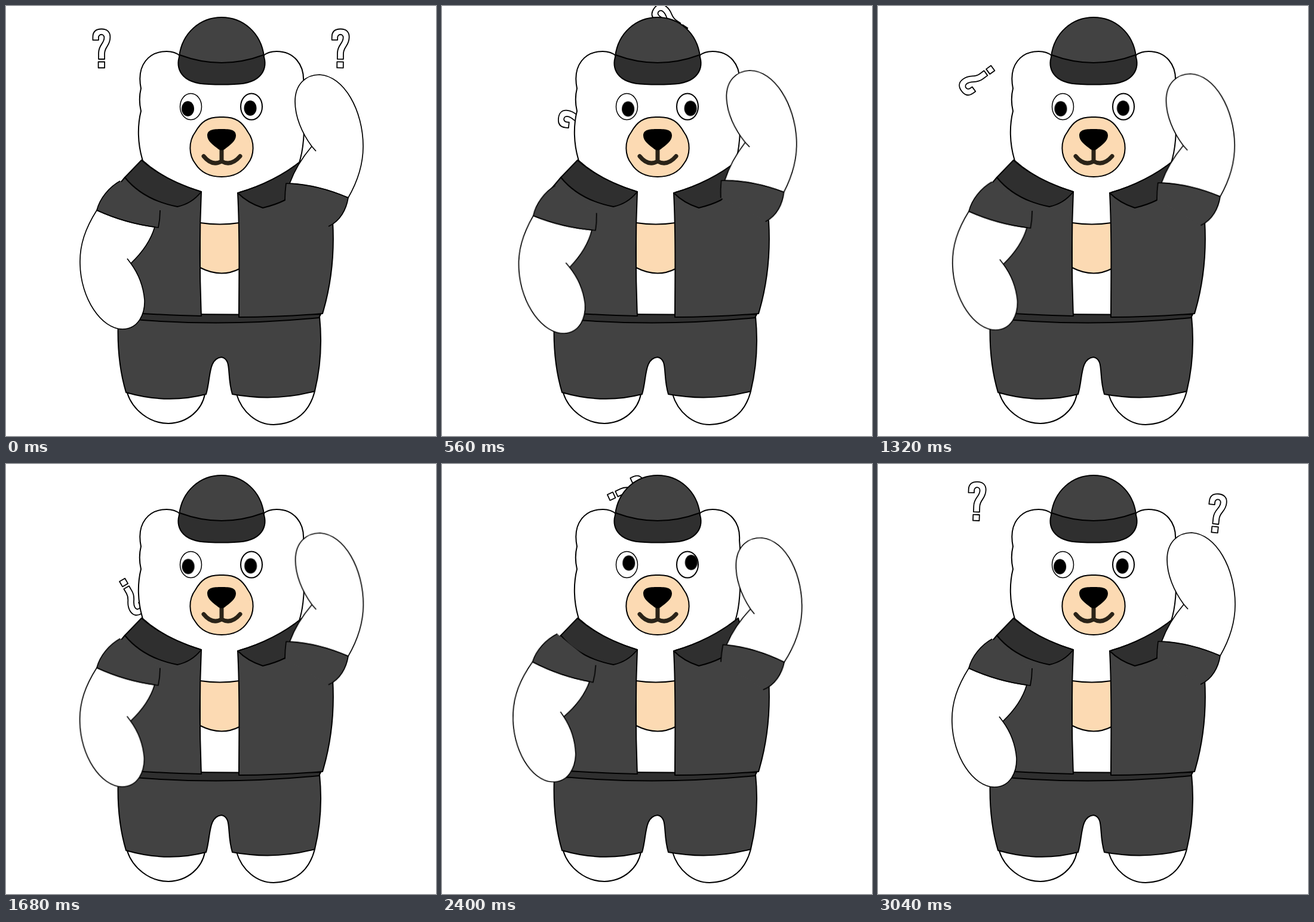
An HTML page that plays this animation: 720x720 px, repeating every 3.08 s.

```html
<!DOCTYPE html>
<html lang="en">
<head>
<meta charset="utf-8">
<title>Puzzled bear</title>
<style>
  :root { --loop: 3080ms; }
  html, body { margin: 0; width: 100%; height: 100%; overflow: hidden; background: #fff; }
  svg { display: block; width: 100vw; height: 100vh; stroke: #000; stroke-width: 2; stroke-linejoin: round; }
  .white { fill: #fff; }
  .cloth { fill: #424242; }
  .trim { fill: #2f2f2f; }
  .tan { fill: #fcdab3; }
  .line { fill: none; }
  .bare { stroke: none; }

  /* Both marks run round closed paths at a steady speed and turn with them */
  .mark {
    transform-origin: 0 0;
    animation: circle var(--loop) steps(77) infinite;
  }
  #markL {
    offset-path: path("M160 71C147 92 175 118 190 146C279 313 573 167 412 66C365 37 292 52 244 25C209 6 181 37 160 71Z");
    offset-rotate: auto -122deg;
  }
  #markR {
    offset-path: path("M560 71C538 39 496 34 457 28C395 18 332 24 269 31C217 36 176 83 163 133C140 215 240 245 340 245C440 245 640 186 560 71Z");
    offset-rotate: auto -235deg;
  }
  @keyframes circle {
    from { offset-distance: 0%; }
    to { offset-distance: 100%; }
  }

  #arms {
    stroke-width: 1.7;
    transform-origin: 361px 328px;
    animation: sway var(--loop) ease-in-out infinite;
  }
  @keyframes sway {
    0%, 50%, 100% { transform: rotate(0deg); }
    25% { transform: rotate(-3deg); }
    75% { transform: rotate(3deg); }
  }

  #pupils { animation: look var(--loop) ease-in-out infinite; }
  @keyframes look {
    0%, 50%, 100% { transform: translate(0, 0); }
    25% { transform: translate(8.4px, 0.5px); }
    75% { transform: translate(9px, -6px); }
    87% { transform: translate(3.5px, -7.5px); }
  }
</style>
</head>
<body>
<svg viewBox="0 0 720 720">
  <defs>
    <g id="shape" class="white" stroke-width="1.8">
      <path d="M-14.5 -14V-19C-14.5 -28 -9 -32.5 0 -32.5C9 -32.5 14.5 -28 14.5 -19C14.5 -4 5 -3 5 9V18H-5V8C-5 -6 4.5 -8 4.5 -18C4.5 -25 -5 -25 -5 -18V-14Z"/>
      <path d="M-5.5 22.5H5V32.5H-5.5Z"/>
    </g>
  </defs>

  <!-- circling marks, behind the bear -->
  <g id="markL" class="mark"><use href="#shape"/></g>
  <g id="markR" class="mark"><use href="#shape"/></g>

  <!-- legs -->
  <path class="white" d="M203 648C212 676 240 699 272 699C305 698 328 676 333 650Z"/>
  <path class="white" d="M386 650C395 680 420 701 448 701C485 700 508 680 517 645Z"/>
  <path class="cloth" d="M188 525C186 570 190 610 201 647Q270 667 335 650C343 625 338 590 361 588C379 592 369 617 379 650Q450 663 517 645C528 600 529 560 525 520Z"/>

  <!-- head and chest -->
  <path class="white bare" d="M325 300H391V517H325Z"/>
  <path class="white" d="M229 259C220 230 220 200 226 176C223 163 223 150 226 138C218 98 240 76 269 76C279 76 286 79 291 83H431C437 78 444 76 453 76C482 76 500 98 498 128C501 160 500 185 499 210C498 235 495 250 491 262Q450 295 388 313L390 330H326L327 311Q265 292 229 259Z"/>
  <path class="white bare" d="M325 305H391V517H325Z"/>
  <path class="tan" d="M325 363Q358 368 391 363V440Q360 456 325 438Z"/>

  <!-- belt and vest -->
  <path class="trim" d="M205 514Q360 518 527 516L524 522Q360 538 205 524Z"/>
  <path class="cloth" d="M199 287L178 312L200 420V513Q270 518 327 519C325 470 323 400 327 311Z"/>
  <path class="cloth" d="M388 313C392 390 390 450 390 521Q460 521 530 515C545 465 550 410 547 360L525 312L490 295L430 335Z"/>
  <path class="trim" d="M227 258Q265 292 327 311Q311 331 287 336Q230 325 199 287Z"/>
  <path class="trim" d="M388 313Q450 295 496 258L505 290L467 325Q451 333 430 338Q405 330 388 313Z"/>

  <!-- cap -->
  <path class="cloth" d="M290 84C295 45 325 19 361 19C397 19 427 45 432 84L361 110Z"/>
  <path class="trim" d="M291 82C284 102 290 130 340 131Q361 132 382 131C432 130 438 102 431 82Q361 108 291 82Z"/>

  <!-- face -->
  <ellipse class="white" cx="309.5" cy="168.5" rx="18" ry="22" stroke-width="1.5"/>
  <ellipse class="white" cx="411" cy="168.5" rx="18" ry="22"/>
  <g id="pupils" class="bare">
    <ellipse cx="304.5" cy="172" rx="10.5" ry="12.7"/>
    <ellipse cx="409" cy="171" rx="10.5" ry="12.7"/>
  </g>
  <path class="tan" d="M361 186C385 185 396 195 405 211C417 227 416 250 405 264C395 280 378 286 361 286C344 286 327 280 317 264C306 250 305 227 317 211C326 195 337 185 361 186Z"/>
  <path class="line" d="M361 238V259M331 251.500Q345 269 361 260Q377 269 392 251.500" stroke="#2a2318" stroke-width="7" stroke-linecap="round"/>
  <path class="bare" d="M361 206C375 206 385 207 385 217C385 226 375 233 366 240Q361 243 356 240C347 233 337 226 337 217C337 207 347 206 361 206Z"/>

  <g id="arms">
    <path class="cloth bare" d="M191 293C173 303 157 322 152 342Q200 364 255 371Q258 357 258 342Z"/>
    <path class="white" d="M152 342C133 372 123 400 124 432C125 490 160 541 195 541C222 541 233 515 232 492C230 470 223 450 209 431C228 413 242 394 249 370Q200 364 152 342Z"/>
    <path class="line" d="M191 293C173 303 157 322 152 342Q200 364 255 371Q258 357 258 342M203 423L209 431"/>

    <path class="cloth bare" d="M469 297Q522 299 573 321C570 340 560 360 540 369L467 326Z"/>
    <path class="white" d="M475 297C483 275 495 255 512 235C495 212 484 185 484 160C484 130 503 115 525 115C566 117 598 175 598 235C598 265 588 295 573 321Q522 299 475 297Z"/>
    <path class="line" d="M467 326Q467 311 469 297Q522 299 573 321C570 340 560 360 540 369M512 235L519 243"/>
  </g>
</svg>
</body>
</html>
```
